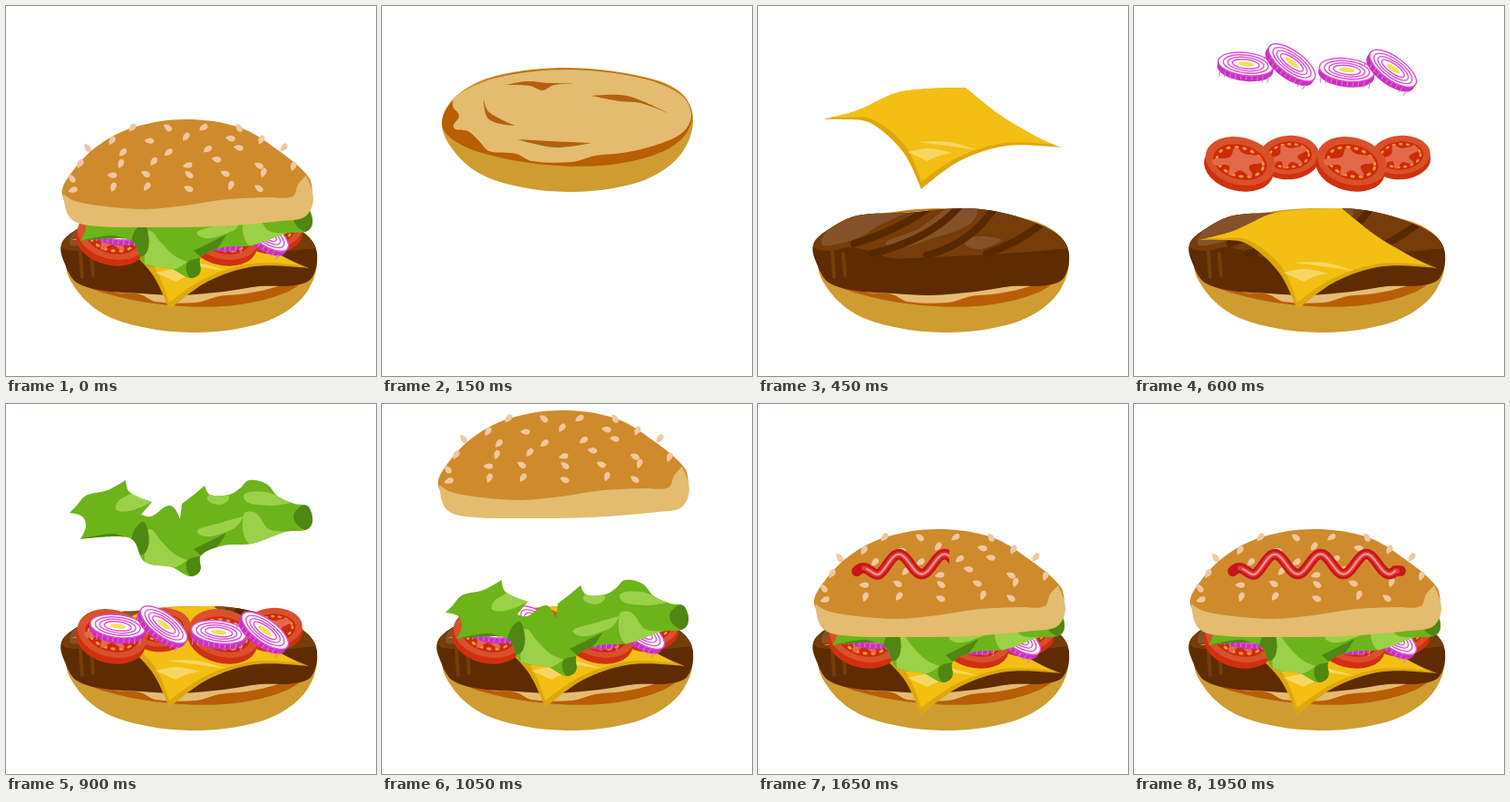
Write an HTML page that moves like this. It is 408 px wide and 408 px high and loops after 2.25 s.

```html
<!DOCTYPE html>
<html lang="en">
<head>
<meta charset="utf-8">
<title>Burger assembly</title>
<style>
html, body { margin: 0; height: 100%; overflow: hidden; background: #fff; }
svg { display: block; width: 100vw; height: 100vh; }
.line { fill: none; stroke-linecap: round; }
</style>
</head>
<body>
<!-- data-pts: closed smooth curve through the points, * marks a corner -->
<svg viewBox="0 0 408 408">
<defs>
  <g id="slice">
    <ellipse cy="6" rx="39" ry="26" fill="#d0300e"/>
    <ellipse cy="-1" rx="39" ry="26" fill="#d9502a"/>
    <ellipse rx="30" ry="19" fill="#cc2a0c"/>
    <ellipse rx="26" ry="15.5" class="line" stroke="#ef9a2d" stroke-width="3" stroke-dasharray="2 7"/>
    <path fill="#e3694a" data-pts="-30,5 -12,-3 -9,-14 2,-10 20,-11 24,-6 11,2 16,12 2,9 -8,17 -11,7 -27,10"/>
  </g>
  <g id="ring">
    <path d="M-31-2V4C-28 21 28 21 31 4V-2Z" fill="#cb30c0"/>
    <path d="M-30 12H30" stroke="#e670df" stroke-width="7" stroke-dasharray="1 5" stroke-dashoffset="-8"/>
    <g fill="#fff" stroke="#dc50d4" stroke-width="1.4">
      <ellipse cy="-2" rx="30.5" ry="12.5"/>
      <ellipse cy="-2" rx="25" ry="9.8"/>
      <ellipse cy="-2" rx="20" ry="7.4"/>
      <ellipse cy="-2" rx="15" ry="5"/>
    </g>
    <ellipse cy="-2" rx="9" ry="2.6" fill="#f6e052"/>
  </g>
  <path id="seed" d="M-5.5 1Q-1-5 4.5-2.5C7 1 3 6-5.5 1Z"/>
  <clipPath id="reveal"><rect id="window" y="150" height="60"/></clipPath>
  <clipPath id="pattyEdge"><use href="#pattyShape"/></clipPath>
  <clipPath id="leafEdge"><use href="#leafShape"/></clipPath>
</defs>

<g id="base">
  <path fill="#cf9c32" data-pts="66,284 80,316 110,341 155,355 205,360 255,356 300,342 332,315 343,278 328,249 284,232 205,223 125,232 82,254"/>
  <path fill="#b85e04" data-pts="66,284 82,305 125,321 180,330 240,331 295,321 330,302 342,275 327,250 284,233 205,224 126,233 83,255"/>
  <path fill="#e3bc70" data-pts="82,254 126,234 205,225 284,234 327,251 341,273 332,294 300,309 265,317 235,320 210,327 165,326 148,318 118,315 108,305 95,293 79,289 85,276 78,265"/>
  <g fill="#b4600f">
    <path data-pts="137,242* 160,238 186,240 232,240* 190,242 177,248 163,243"/>
    <path data-pts="231,254* 270,254 315,273* 285,262 262,260"/>
    <path data-pts="149,302* 185,304 231,306* 191,311"/>
    <path data-pts="112,258* 118,272 147,287* 118,280"/>
  </g>
</g>

<g id="patty"><g transform="translate(0 117)">
  <path id="pattyShape" fill="#5e2c00" data-pts="61,146 80,128 110,114 165,111 225,106 265,110 305,122 333,137 343,156 337,183 318,191 280,192 240,198 190,202 150,200 108,197 78,188 66,170"/>
  <g clip-path="url(#pattyEdge)">
    <path fill="#763c09" data-pts="61,147 79,153 100,149 122,153 148,161 190,160 255,157 300,154 344,150* 344,100* 61,100*"/>
    <g fill="#845129">
      <path data-pts="70,144 90,120 125,108 166,110* 130,127 115,137 90,145"/>
      <path data-pts="143,147 178,128 205,108* 240,106 235,122 200,137"/>
      <path data-pts="228,143 250,137 270,141* 245,151"/>
    </g>
    <path class="line" stroke="#582800" stroke-width="8" d="M106 145Q150 132 185 108M126 156Q190 140 222 104M186 158Q235 145 262 104M252 156Q285 145 312 124"/>
    <path class="line" stroke="#763c09" stroke-width="4" d="M82 154L84 182M94 156L96 180"/>
  </g>
</g></g>

<g id="cheese">
  <path fill="#dda70d" data-pts="72,258* 110,248 152,229 190,224 229,223* 265,252 300,274 334,289* 275,287 222,304 180,335* 160,294 124,262 95,258"/>
  <path fill="#f3bf13" data-pts="80,256* 110,248 152,229 190,224 229,223* 265,252 300,273 324,286* 272,284 220,300 180,327* 163,288 126,258 95,256"/>
  <g fill="#f8d661">
    <path data-pts="165,294* 188,290 214,295* 200,298 187,304*"/>
    <path data-pts="177,283* 210,283 243,292* 215,288"/>
  </g>
</g>

<g id="tomato">
  <g id="tomatoPair">
    <use href="#slice" transform="translate(171 247) rotate(-4) scale(.84 .82)"/>
    <use href="#slice" transform="translate(117 254) rotate(14)"/>
  </g>
  <use href="#tomatoPair" x="123"/>
</g>

<g id="onion">
  <g id="onionPair">
    <use href="#ring" transform="translate(123 247) rotate(7)"/>
    <use href="#ring" transform="translate(173 245) rotate(36)"/>
  </g>
  <use href="#onionPair" x="111.5" y="6.5"/>
</g>

<g id="lettuce"><g transform="translate(0 110)">
  <path id="leafShape" fill="#6cb41a" data-pts="70,120* 78,112 88,101 112,95 132,84* 136,97 161,108* 149,122* 160,124 181,112 192,127* 194,110* 207,100 219,90* 225,100 246,100 258,93 268,84 287,88 300,102 318,110 334,114 335,136 308,141 271,154 240,156 215,167 214,184 203,190 183,180 153,174 140,150 120,146 82,149* 88,135 84,124"/>
  <g clip-path="url(#leafEdge)">
    <g fill="#9bd149">
      <path data-pts="124,107 140,98* 161,108* 140,117 122,117"/>
      <path data-pts="149,150 158,138 170,150 185,165 200,172* 183,181 153,174* 152,160"/>
      <path data-pts="222,103 240,97 246,104 235,111"/>
      <path data-pts="212,143 240,130 262,124* 250,138"/>
      <path data-pts="262,122 275,120 290,138 310,140* 290,148 268,154"/>
      <path data-pts="262,103 285,97 314,109* 288,112"/>
    </g>
    <g fill="#4e8712">
      <path data-pts="138,152 150,130 157,142 156,160 148,166"/>
      <path data-pts="207,160* 243,142* 232,158 215,167*"/>
      <path data-pts="318,120 335,112 338,138 322,134"/>
      <path data-pts="82,149* 118,143 138,150* 118,147"/>
      <path data-pts="200,173 217,168* 213,187 203,190"/>
    </g>
  </g>
</g></g>

<g id="top">
  <path fill="#cf8a2b" data-pts="62,211 72,187 100,158 140,137 198,128 258,137 300,162 334,192 338,213* 300,230 80,230*"/>
  <path fill="#e3bc70" data-pts="63,210* 76,218 110,224 154,227 198,223 244,216 290,214 316,213 322,200 331,190* 339,215 330,235 304,240 231,246 164,247 91,245 70,236"/>
  <g id="seeds" fill="#f0c7a0"/>
</g>

<g id="ketchup" class="line" clip-path="url(#reveal)">
  <path stroke="#c9151b" stroke-width="11.5" data-inset="0"/>
  <path stroke="#e2403c" stroke-width="5.5" data-inset="8"/>
  <path stroke="#f4a097" stroke-width="1.8" data-inset="11"/>
</g>
</svg>

<script>
const STEP = 150, LOOP = 2250, LAST = 13, SETTLE = 9;
const el = id => document.getElementById(id);
const all = css => document.querySelectorAll(css);

// closed curve whose handles run parallel to the line between the neighbours
function smooth(text) {
  const words = text.split(" "), n = words.length;
  const pts = words.map(w => w.match(/-?[\d.]+/g).map(Number));
  const at = i => pts[(i + n) % n];
  const handle = (i, other) => {
    if (words[i % n].endsWith("*")) return at(i);
    const [x, y] = at(i), [ax, ay] = at(i - 1), [bx, by] = at(i + 1), [ox, oy] = at(other);
    const reach = Math.sign(other - i) * Math.hypot(ox - x, oy - y) / 3 / Math.hypot(bx - ax, by - ay);
    return [x + (bx - ax) * reach, y + (by - ay) * reach];
  };
  return `M${pts[0]}` + pts.map((_, i) => `C${handle(i, i + 1)} ${handle(i + 1, i)} ${at(i + 1)}`).join("") + "Z";
}
for (const path of all("[data-pts]")) path.setAttribute("d", smooth(path.dataset.pts));

// sesame: rows that follow the dome, slightly scattered
let state = 77;
const random = () => (state = state * 16807 % 2147483647) / 2147483647;
const scatter = size => (random() - .5) * size;
for (let row = 0; row < 6; row++) {
  const y = 137 + 13 * row, count = 4 + Math.min(row, 3);
  const half = 130 * Math.sqrt(1 - ((211 - y) / 83) ** 2);
  for (let i = 0; i < count; i++) {
    const x = 198 + half * (2 * i / (count - 1) - 1) + scatter(row && 14);
    const place = `translate(${x} ${y + scatter(row && 8)}) rotate(${scatter(130)})`;
    if (x < 318) el("seeds").innerHTML += `<use href="#seed" transform="${place}"/>`;
  }
}

// ketchup: a wave that swells out of a blob on the left
function wave(x) {
  const swell = Math.min(11, (x - 106) / 2.5);
  return 176.5 + 9 * Math.exp((109 - x) / 12) + swell * Math.cos((Math.min(x, 288) - 180.5) * 2 * Math.PI / 50.5);
}
for (const path of all("[data-inset]")) {
  const inset = +path.dataset.inset, pts = [];
  for (let x = 109 + inset; x <= 294 - inset / 2; x++) pts.push([x, wave(x)]);
  path.setAttribute("d", "M" + pts.join("L"));
}

// first: step of entry; drop: heights while falling; sink: final squash; start: offset in the opening pose
const parts = {
  base:    { first: 1, drop: [-155] },
  patty:   { first: 2, drop: [-117] },
  cheese:  { first: 3, drop: [-133], sink: 8 },
  tomato:  { first: 4, drop: [-82], sink: 5 },
  onion:   { first: 4, drop: [-181, -75], sink: 6 },
  lettuce: { first: 5, drop: [-164, -110], sink: 7 },
  top:     { first: 7, drop: [-121], sink: 10, start: -3 }
};
const sauceEnds = [155, 211, 258, 302];

function draw(now) {
  const step = Math.min(LAST, Math.floor(now % LOOP / STEP));
  for (const [id, { first, drop, sink = 0, start = 0 }] of Object.entries(parts)) {
    const y = step === 0 ? start : step >= SETTLE ? sink : drop[step - first] ?? 0;
    el(id).setAttribute("transform", `translate(0 ${y})`);
    el(id).style.display = step === 0 || step >= first ? "" : "none";
  }
  el("window").setAttribute("width", sauceEnds[step - SETTLE - 1] ?? 0);
}

const begin = performance.now();
function tick() {
  draw(performance.now() - begin);
  requestAnimationFrame(tick);
}
tick();
</script>
</body>
</html>
```
